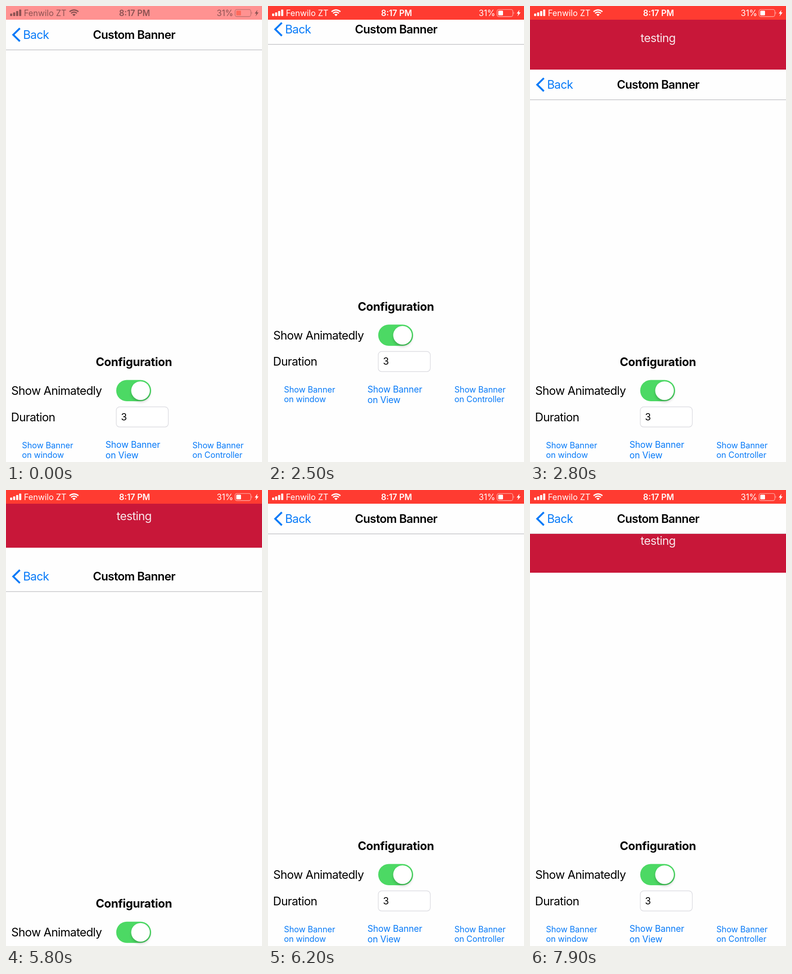
An HTML page that plays this animation: 561 px wide and 998 px high, repeating every 8000 ms.

```html
<!DOCTYPE html>
<html lang="en">
<head>
<meta charset="utf-8">
<title>Custom Banner</title>
<style>
html, body { margin: 0; width: 100%; height: 100%; overflow: hidden; background: #fefefe; }
svg { display: block; width: 561px; height: 998px; font-family: Inter, Roboto, sans-serif; }
text { white-space: pre; }
.body { font-size: 25.4px; letter-spacing: -.66px; }
.title { font-weight: 600; }
.head { font-weight: 700; letter-spacing: -.34px; }
.mid { text-anchor: middle; }
.link { font-size: 18px; letter-spacing: -.07px; fill: #077af8; }
.wide { font-size: 19.4px; letter-spacing: -.16px; }
.status { font-size: 18px; fill: currentColor; }
.banner rect { fill: #c81739; }
.banner text { fill: #f8e8ec; }
</style>
</head>
<body>
<svg viewBox="0 0 561 998">
  <defs>
    <clipPath id="belowNav"><rect y="96" width="561" height="902"/></clipPath>
    <filter id="soft" x="-50%" y="-50%" width="200%" height="200%"><feGaussianBlur stdDeviation="3"/></filter>
    <clipPath id="aroundSwitch"><rect x="235" y="812" width="90" height="64"/></clipPath>
    <g id="banner" class="banner">
      <rect width="561" height="139.2"/>
      <text class="body mid" x="280.7" y="78.5">testing</text>
    </g>
  </defs>
  <rect width="561" height="998" fill="#fefefe"/>

  <g id="content">
    <text class="body head mid" x="280.2" y="788">Configuration</text>
    <text class="body" x="11.6" y="851">Show Animatedly</text>
    <rect x="241.5" y="818.5" width="76.5" height="46.5" rx="23.2" fill="#4cd964"/>
    <g clip-path="url(#aroundSwitch)">
      <circle cx="295" cy="846" r="20" opacity=".22" filter="url(#soft)"/>
    </g>
    <circle cx="294.8" cy="841.8" r="20.4" fill="#fff"/>
    <text class="body" x="11.1" y="908.5">Duration</text>
    <rect x="241.6" y="877.4" width="114" height="44" rx="7.5" fill="#fff" stroke="#d6d6dc" stroke-width="1.2"/>
    <text x="252" y="906.5" font-size="21">3</text>
    <g class="link">
      <text x="35" y="967.5">Show Banner</text>
      <text x="35" y="988.5">on window</text>
      <text class="wide" x="218" y="967">Show Banner</text>
      <text class="wide" x="218" y="990">on View</text>
      <text x="408.6" y="967.5">Show Banner</text>
      <text x="408.6" y="988.5">on Controller</text>
    </g>
  </g>

  <g id="nav">
    <rect y="30" width="561" height="65.5" fill="#fefefe"/>
    <rect y="95.3" width="561" height="1.5" fill="#c4c4c7"/>
    <path d="M30.4 48.7 15.8 63 30.4 77.3" fill="none" stroke="#077af8" stroke-width="4"/>
    <text class="body" x="37.4" y="72" fill="#077af8">Back</text>
    <text class="body title mid" x="280.7" y="72">Custom Banner</text>
  </g>

  <g clip-path="url(#belowNav)"><use id="viewBanner" href="#banner"/></g>
  <use id="topBanner" href="#banner"/>

  <g id="status">
    <rect id="bar" width="561" height="30"/>
    <g fill="currentColor">
      <rect x="9" y="16.5" width="4.6" height="5.5" rx="1"/>
      <rect x="15.6" y="14" width="4.6" height="8" rx="1"/>
      <rect x="22.2" y="11" width="4.6" height="11" rx="1"/>
      <rect x="28.8" y="7.8" width="4.6" height="14.2" rx="1"/>
      <path d="M149 22.3 145.4 18.7Q149 15.9 152.6 18.7Z"/>
      <path d="M538.2 12.5q2.2 2.5 0 5.4Z" opacity=".6"/>
      <path d="M551 8.5 545 16.5H548.6L547 22.5 553.5 14H549.8Z"/>
    </g>
    <g fill="none" stroke="currentColor">
      <path d="M142.6 16Q149 10.6 155.4 16M139.2 12.5Q149 4.8 158.8 12.5" stroke-width="2.7"/>
      <rect x="502" y="7.6" width="34.5" height="15.6" rx="4" stroke-width="1.4" opacity=".55"/>
    </g>
    <rect id="charge" x="504.6" y="10.2" width="10.4" height="10.4" rx="1.5"/>
    <text class="status" x="39.2" y="22">Fenwilo ZT</text>
    <text class="status mid title" x="281.7" y="22">8:17 PM</text>
    <text class="status" x="461.8" y="22">31%</text>
  </g>
</svg>
<script>
const LOOP = 8000, STEP = 100, SLIDE = 400, HEIGHT = 139.2, STATUS = 30, NAV_BOTTOM = 96;
const SHOW = 2400, HIDE = 5715, SHOW_IN_VIEW = 7674;
const el = id => document.getElementById(id);
const clamp = v => Math.min(1, Math.max(0, v));
const shift = (id, y) => el(id).setAttribute('transform', `translate(0 ${y.toFixed(2)})`);
const mix = (a, b, p) => `rgb(${a.map((v, i) => Math.round(v + (b[i] - v) * p))})`;

// cubic-bezier(.42, 0, .58, 1)
function ease(x) {
  if (x <= 0 || x >= 1) return clamp(x);
  let lo = 0, hi = 1, s;
  for (let i = 0; i < 24; i++) {
    s = (lo + hi) / 2;
    const bx = 1.26 * s * (1 - s) ** 2 + 1.74 * s * s * (1 - s) + s ** 3;
    if (bx < x) lo = s; else hi = s;
  }
  return s * s * (3 - 2 * s);
}

const slide = (t, start) => ease((t - start) / SLIDE);

function draw(t) {
  const fade = clamp(t / 300);
  const white = [255, 255, 255];
  el('bar').setAttribute('fill', mix([255, 146, 145], [255, 59, 49], fade));
  el('charge').setAttribute('fill', mix([255, 106, 92], white, fade));
  el('status').style.color = mix([139, 82, 82], white, fade);

  // While the banner is up, the page loses its status inset and shrinks.
  const y = HEIGHT * (slide(t, SHOW) - slide(t, HIDE));
  const pushed = t > SHOW && t < HIDE;
  shift('nav', y - (pushed ? STATUS : 0));
  shift('content', y - (pushed ? HEIGHT : 0));
  shift('topBanner', y - HEIGHT);
  shift('viewBanner', NAV_BOTTOM - HEIGHT * (1 - slide(t, SHOW_IN_VIEW)));
  el('viewBanner').style.display = t > SHOW_IN_VIEW + STEP ? '' : 'none';
}

const begin = performance.now();
function tick() {
  const t = (performance.now() - begin) % LOOP;
  draw(Math.floor(t / STEP) * STEP);
  requestAnimationFrame(tick);
}
tick();
</script>
</body>
</html>
```
